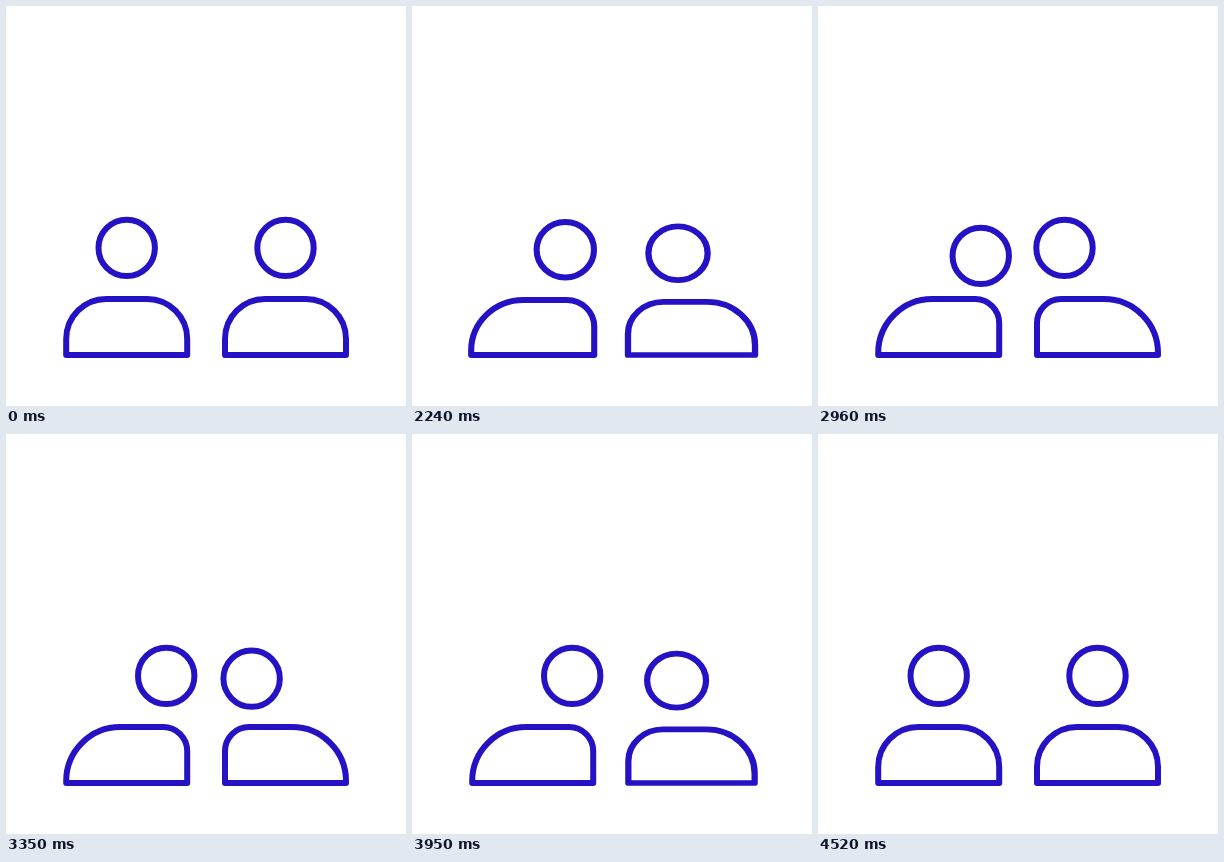
An HTML page for the animation above (4550 ms loop, 400 px wide and 400 px high).

```html
<!DOCTYPE html>
<html lang="en">
<head>
<meta charset="utf-8">
<title>Two people talking</title>
<style>
  html, body { margin: 0; width: 100%; height: 100%; overflow: hidden; background: #fff; }
  svg { display: block; width: 100%; height: 100%; }
  g { fill: none; stroke: #2412c4; stroke-width: 6; stroke-linejoin: round; }
</style>
</head>
<body>
<svg viewBox="0 0 400 400">
  <g id="left"><circle r="28.2"/><path/></g>
  <g id="right"><circle r="28.2"/><path/></g>
</svg>
<script>
const LOOP = 4550, STILL = 2030, STEP = 30;
const BASE = 349, TOP = 293, HALF = 60.5, HEAD_Y = 241.9;
const MOVE = 350; // travel time of a lean

// dir: side the person leans to; leanIn, leanOut, nod: start times
const people = [
  { id: 'left', x: 120.7, dir: 1, reach: 39.5, leanIn: 1990, nod: 2500, leanOut: 4060, depth: [10, 8] },
  { id: 'right', x: 279.5, dir: -1, reach: 33, leanIn: 2090, nod: 3090, leanOut: 3760, depth: [11.5, 8] }
];

const ease = p => (1 - Math.cos(Math.PI * Math.min(1, Math.max(0, p)))) / 2;
const mix = (a, b, p) => a + (b - a) * p;

// Eased value through [time, value] keys
function track(keys, t) {
  if (t <= keys[0][0]) return keys[0][1];
  for (let i = 1; i < keys.length; i++) {
    const [t0, v0] = keys[i - 1], [t1, v1] = keys[i];
    if (t < t1) return mix(v0, v1, ease((t - t0) / (t1 - t0)));
  }
  return keys[keys.length - 1][1];
}

// Squash on departure, stretch on arrival
const SQUASH = [[0, 0], [150, 0.05], [365, -0.024], [460, 0]];

function bodyPath(dir, lean) {
  const near = mix(40, 24, lean), far = mix(40, 54, lean);
  const [rl, rr] = dir > 0 ? [far, near] : [near, far];
  return `M${-HALF} ${BASE}V${TOP + rl}A${rl} ${rl} 0 0 1 ${rl - HALF} ${TOP}` +
    `H${HALF - rr}A${rr} ${rr} 0 0 1 ${HALF} ${TOP + rr}V${BASE}Z`;
}

function pose(p, t) {
  const lean = ease((t - p.leanIn) / MOVE) - ease((t - p.leanOut) / MOVE);
  const squash = track(SQUASH, t - p.leanIn) + track(SQUASH, t - p.leanOut);
  const nod = track([[0, 0], [155, p.depth[0]], [310, 0], [465, p.depth[1]], [620, 0]], t - p.nod);
  const sx = 1 + squash, sy = 1 - squash;
  p.group.setAttribute('transform', `translate(${p.x} ${BASE}) scale(${sx} ${sy}) translate(0 ${-BASE})`);
  p.head.setAttribute('cx', p.dir * (p.reach * lean + nod * 0.32));
  p.head.setAttribute('cy', HEAD_Y + nod);
  p.body.setAttribute('d', bodyPath(p.dir, lean));
}

for (const p of people) {
  p.group = document.getElementById(p.id);
  p.head = p.group.querySelector('circle');
  p.body = p.group.querySelector('path');
}

const start = performance.now();
function draw() {
  const now = (performance.now() - start) % LOOP;
  const t = now < STILL ? 0 : STILL + Math.floor((now - STILL) / STEP) * STEP;
  people.forEach(p => pose(p, t));
  requestAnimationFrame(draw);
}
draw();
</script>
</body>
</html>
```
